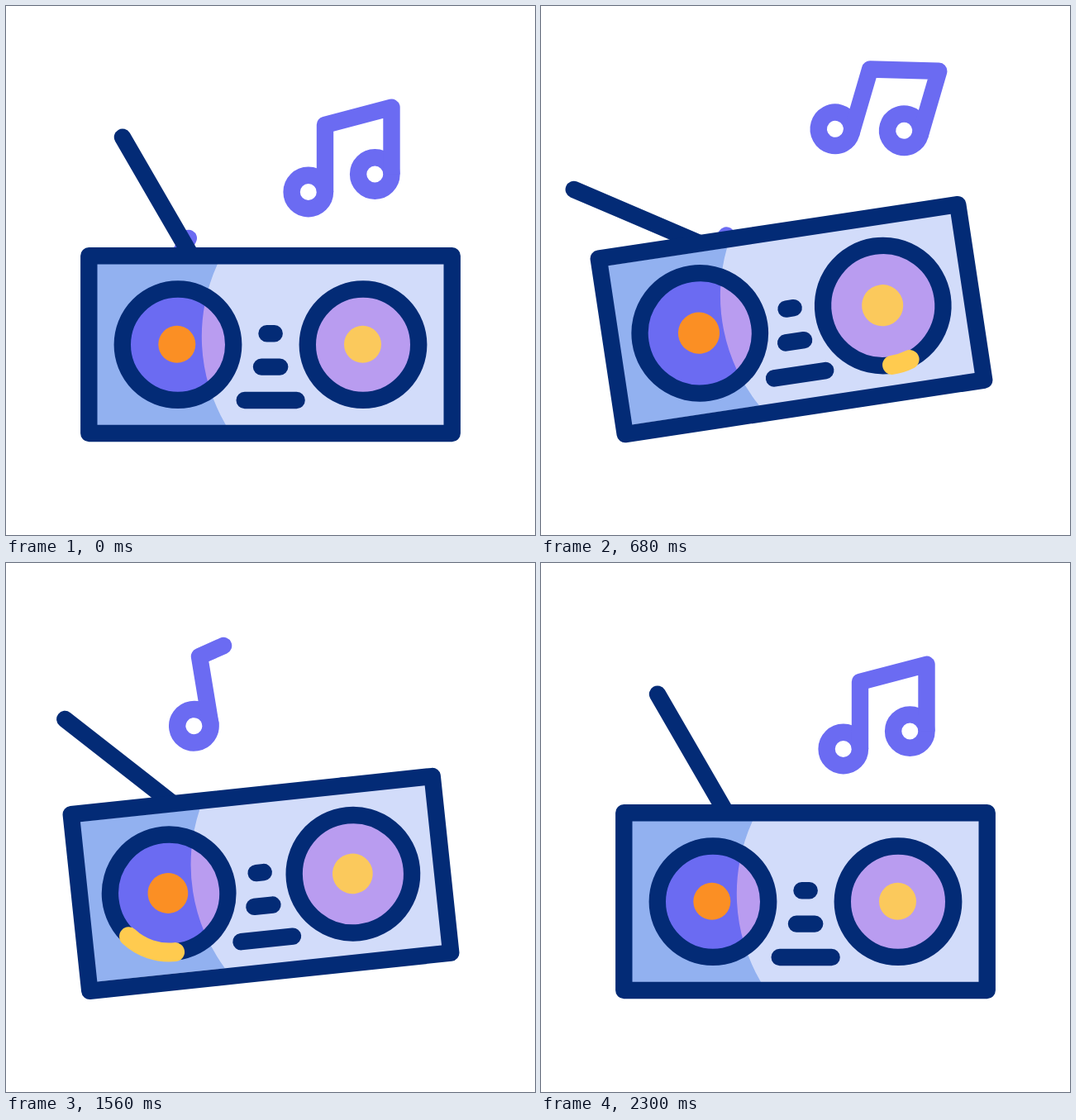
Write an HTML page that moves like this. It is 640 by 640 pixels and loops after 2.4 s.

```html
<!DOCTYPE html>
<html lang="en">
<head>
<meta charset="utf-8">
<title>Radio</title>
<style>
  html, body { margin: 0; width: 100%; height: 100%; overflow: hidden; background: #fff; }
  svg { display: block; width: 100%; height: 100%; }
  .line { fill: none; stroke: #032b76; stroke-width: 20.4; stroke-linecap: round; stroke-linejoin: round; }
  .note { fill: none; stroke: #6b6bf2; stroke-width: 20.4; stroke-linecap: round; stroke-linejoin: round; }
  .beam { fill: none; stroke: #ffcb4f; stroke-width: 23; stroke-linecap: round; }
</style>
</head>
<body>
<svg viewBox="0 0 640 640">
  <defs>
    <clipPath id="shade"><path d="M100 312H256A211 211 0 0 0 266 507H100Z"/></clipPath>
  </defs>

  <g id="duo" class="note">
    <circle cx="365.8" cy="225" r="20.2"/>
    <circle cx="446.3" cy="203.5" r="20.2"/>
    <path d="M386 225V143.8L466.5 122.7V203.5" stroke-linecap="butt"/>
  </g>

  <g id="solo" class="note">
    <circle cx="-15" cy="35" r="20.2"/>
    <path d="M5.2 35V-47L36 -55"/>
  </g>

  <g id="radio">
    <path id="antenna" class="line" d="M224 302V136.4"/>
    <rect x="100.3" y="302.2" width="439.4" height="214.8" fill="#d2dcfa"/>
    <rect x="100.3" y="302.2" width="439.4" height="214.8" fill="#92b1f0" clip-path="url(#shade)"/>
    <rect class="line" x="100.3" y="302.2" width="439.4" height="214.8"/>
    <path class="line" d="M315.5 396.2H324.7M309 436.6H331.2M288.7 477H351.6"/>

    <circle class="cone" cx="208" cy="409.7" fill="#b99cf0"/>
    <circle class="cone" cx="208" cy="409.7" fill="#6b6bf2" clip-path="url(#shade)"/>
    <circle class="cone line" cx="208" cy="409.7"/>
    <circle class="dot" cx="206.8" cy="409.3" fill="#fb8f24"/>
    <circle id="beamL" class="cone beam" pathLength="360" transform="translate(208 409.7) rotate(90) scale(1 -1)"/>

    <circle class="cone" cx="432" cy="409.7" fill="#b99cf0"/>
    <circle class="cone line" cx="432" cy="409.7"/>
    <circle class="dot" cx="431.5" cy="409.3" fill="#fbc95c"/>
    <circle id="beamR" class="cone beam" pathLength="360" transform="translate(432 409.7) rotate(90) scale(1 -1)"/>
  </g>
</svg>
<script>
const LOOP = 2400;
const $ = id => document.getElementById(id);
const cones = document.querySelectorAll('.cone');
const dots = document.querySelectorAll('.dot');

const linear = u => u;
const smooth = u => u * u * (3 - 2 * u);

// Ease with flat ends; x1 and x2 are the handle lengths
const flatEase = (x1, x2) => u => {
  let lo = 0, hi = 1;
  for (let i = 0; i < 24; i++) {
    const s = (lo + hi) / 2, r = 1 - s;
    if (3 * r * r * s * x1 + 3 * r * s * s * x2 + s * s * s < u) lo = s; else hi = s;
  }
  return smooth(lo);
};
const swing = flatEase(.2, .46);

// Steps are [time, value, ease towards this value]
function track(t, steps) {
  if (t <= steps[0][0]) return steps[0][1];
  for (let i = 1; i < steps.length; i++) {
    const [t0, a] = steps[i - 1], [t1, b, ease = smooth] = steps[i];
    if (t < t1) return a + (b - a) * ease((t - t0) / (t1 - t0));
  }
  return steps[steps.length - 1][1];
}

const TILT = [[100, 0], [1300, 12.9, swing], [1800, 0]];
const ANTENNA = [[100, 30.1], [700, 58.4], [1300, 58.4], [1980, 20.5], [2310, 30.1]];
const PULSE = [[110, 0], [700, 1], [960, 0], [1100, 0], [1800, 1], [2260, 0]];
const HEAD = [[600, 0], [1200, 360]];
const TAIL = [[800, 0], [1400, 360]];
const DUO = {
  y: [[100, 0], [1100, -102], [1300, 156, () => 1], [2310, 0]],
  turn: [[100, 0], [1100, 28, linear], [1700, 28], [2310, 0]],
  alpha: [[900, 1], [1100, 0, linear], [1300, 0], [1301, 1]]
};
const SOLO = {
  y: [[600, 344.7], [1800, 139]],
  turn: [[600, -47], [1800, 0, linear]],
  alpha: [[1600, 1], [1800, 0, linear]]
};

function beam(el, t) {
  const head = track(t, HEAD), tail = track(t, TAIL);
  el.style.visibility = head - tail > .01 ? 'visible' : 'hidden';
  el.setAttribute('stroke-dasharray', `${head - tail} 720`);
  el.setAttribute('stroke-dashoffset', -tail);
}

function draw(t) {
  $('radio').setAttribute('transform', `rotate(${-track(t, TILT)} 108 508)`);
  $('antenna').setAttribute('transform', `rotate(${-track(t, ANTENNA)} 224 302)`);

  const k = track(t, PULSE);
  cones.forEach(c => c.setAttribute('r', 67.2 + 5.5 * k));
  dots.forEach(d => d.setAttribute('r', 22.5 + 2.6 * k));
  beam($('beamR'), t);
  beam($('beamL'), t - 300);

  $('duo').setAttribute('transform', `translate(0 ${track(t, DUO.y)}) rotate(${track(t, DUO.turn)} 406 184)`);
  $('duo').setAttribute('opacity', track(t, DUO.alpha));
  $('solo').setAttribute('transform', `translate(236.5 ${track(t, SOLO.y)}) rotate(${track(t, SOLO.turn)})`);
  $('solo').setAttribute('opacity', track(t, SOLO.alpha));
}

const start = performance.now();
function tick() {
  draw((performance.now() - start) % LOOP);
  requestAnimationFrame(tick);
}
tick();
</script>
</body>
</html>
```
